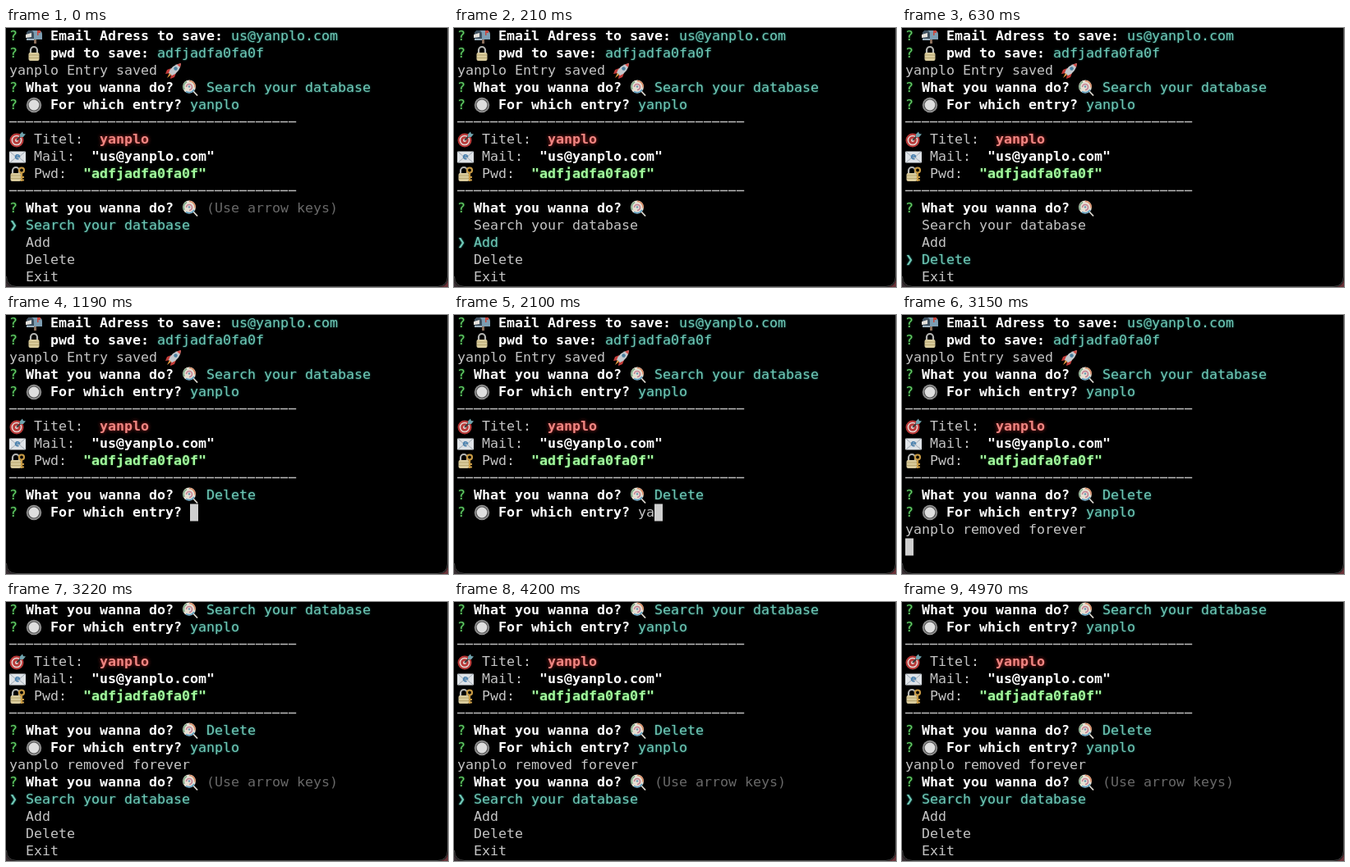
Recreate the animation shown at these times as an HTML page. Size 538 by 316 pixels, loop 5110 ms.

```html
<!DOCTYPE html>
<html lang="en">
<head>
<meta charset="utf-8">
<title>Password terminal</title>
<style>
  html, body { margin: 0; width: 100%; height: 100%; overflow: hidden; background: #000; }
  svg { display: block; width: 538px; height: 316px; }
  text { font: 16.61px "DejaVu Sans Mono", monospace; fill: #c4c4c4; }
  .b { font-weight: bold; fill: #fff; }
  .ask { fill: #64cf66; filter: drop-shadow(0 0 1px #1d6b2a); }
  .teal { fill: #70c8b6; filter: drop-shadow(0 0 1.2px #1f6f66); }
  .dim { fill: #686868; }
  .red { font-weight: bold; fill: #f08682; filter: drop-shadow(0 0 2px #b92a2a); }
  .green { font-weight: bold; fill: #a3f79d; filter: drop-shadow(0 0 1px #246f2c); }
</style>
</head>
<body>
<svg viewBox="0 0 538 316">
  <defs>
    <g id="mailbox">
      <path d="M10 12h3v7h-3z" fill="#8b6f5c"/>
      <path d="M1 14V8q0-5 4.500-5H15q5 0 5 5v6z" fill="#7c9db2"/>
      <path d="M1 14V8q0-5 4.500-5T10 8v6z" fill="#3d4f5e"/>
      <path d="M0 8l7-2v5l-7 1z" fill="#e5e2dc"/>
      <path d="M1 13h9v2H1z" fill="#9db2c0"/>
      <path d="M14 9V3h4v3h-2.500v3z" fill="#c8483f"/>
    </g>
    <g id="lock">
      <path d="M6 10V6a4 4 0 0 1 8 0v4" fill="none" stroke="#b5b6b4" stroke-width="2.200"/>
      <rect x="3.500" y="9" width="13" height="10" rx="2" fill="#d9cb9c"/>
      <path d="M4 12h12M4 15.500h12" stroke="#b8a771"/>
    </g>
    <g id="lockkey">
      <use href="#lock" x="-2"/>
      <g fill="none" stroke="#c79a45" stroke-width="2.200">
        <circle cx="15" cy="5.500" r="3"/>
        <path d="M15 9v10M15 14h3M15 17.500h3"/>
      </g>
    </g>
    <g id="rocket">
      <path d="M7 7L2 9l-2 5 6-1zM13 13l-2 5-5 2 1-6z" fill="#c43c39"/>
      <path d="M4 13Q7 3 19 1q-1 11-11 15z" fill="#c3c9ce"/>
      <path d="M14 2.500l5-1.500-1 5z" fill="#d24d47"/>
      <circle cx="12.500" cy="7.500" r="2.200" fill="#4a7f9f"/>
      <path d="M5 13l2 2-5 4z" fill="#e59a42"/>
    </g>
    <g id="candy">
      <path d="M13 13l6 6.500" stroke="#dedad2" stroke-width="1.800"/>
      <circle cx="9" cy="8.500" r="8" fill="#e6dfd2"/>
      <g fill="none" stroke-width="1.600">
        <path d="M9 1.500a7 7 0 0 1 7 8" stroke="#d98a63"/>
        <path d="M15 12a7 7 0 0 1-10 2.500" stroke="#5f9fc2"/>
        <path d="M3 12a7 7 0 0 1 3-9.500" stroke="#79aa86"/>
        <path d="M5.500 9a3.500 3.500 0 1 1 3.500 3.500" stroke="#c27f94"/>
      </g>
      <circle cx="9" cy="8.500" r="1.200" fill="#6796b0"/>
    </g>
    <g id="radio">
      <circle cx="10" cy="10" r="9.200" fill="#929292"/>
      <circle cx="10" cy="10" r="7.600" fill="#555"/>
      <circle cx="10" cy="10" r="6.400" fill="#dedede"/>
    </g>
    <g id="target">
      <circle cx="9" cy="11" r="8.500" fill="#b93a39"/>
      <circle cx="9" cy="11" r="5.600" fill="none" stroke="#e5d8d5" stroke-width="1.500"/>
      <circle cx="9" cy="11" r="2" fill="#e5d8d5"/>
      <path d="M9 11l7-7" stroke="#3b3b3b" stroke-width="2"/>
      <path d="M13 7V3.500l3-3 1 2.500 3 .5-3 3.500z" fill="#6fa3ad"/>
    </g>
    <g id="mail">
      <rect y="3.500" width="20" height="14" rx="1" fill="#dfe3e7"/>
      <path d="M1 17l7-6M19 17l-7-6M1 4l9 8 9-8" fill="none" stroke="#a0aab4"/>
      <path d="M7.500 10h5a2.500 2.500 0 1 0-1 2.300" fill="none" stroke="#4a80ad" stroke-width="1.600"/>
    </g>
  </defs>
  <g id="screen"></g>
  <path d="M0 304v12h12q-12 0-12-12z" fill="#3a3034"/>
  <path d="M538 304v12h-12q12 0 12-12z" fill="#6a3339"/>
  <path d="M.5 303q0 12.500 12.500 12.500h512q12.500 0 12.500-12.500V0" fill="none" stroke="#4c4c4c"/>
</svg>
<script>
const LOOP = 5110, COL = 10, ROW = 21, LEFT = 4;
const NAME = 'yanplo';
const ITEMS = ['Search your database', 'Add', 'Delete', 'Exit'];
const screen = document.getElementById('screen');

const text = (col, row, str, cls = '') =>
  `<text class="${cls}" x="${LEFT + col * COL}" y="${15 + row * ROW}">${str}</text>`;
const icon = (col, row, id) =>
  `<use href="#${id}" x="${LEFT + col * COL}" y="${row * ROW}"/>`;
const rule = row =>
  `<path d="M${LEFT} ${9.5 + row * ROW}h350" stroke="#bcbcbc" stroke-width="1.3" stroke-dasharray="9.2 .8"/>`;
const cursor = (col, row) =>
  `<rect x="${LEFT + col * COL}" y="${row * ROW - .5}" width="10" height="21" fill="#cfcfcf"/>`;

const ask = (row, id, label, value, cls = 'teal') =>
  text(0, row, '?', 'ask') + icon(2, row, id) + text(5, row, label, 'b') +
  text(6 + label.length, row, value, cls);
const action = (row, value, cls = 'teal') =>
  text(0, row, '?', 'ask') + text(2, row, 'What you wanna do?', 'b') +
  icon(21, row, 'candy') + text(24, row, value, cls);
const entry = (row, value, cls) => ask(row, 'radio', 'For which entry?', value, cls);
const field = (row, id, label, col, value, cls) =>
  icon(0, row, id) + text(3, row, label) + text(col, row, value, cls);
const menu = (row, pick, hint) =>
  action(row, hint ? '(Use arrow keys)' : '', 'dim') +
  ITEMS.map((item, i) =>
    (i === pick ? text(0, row + 1 + i, '❯', 'teal') : '') +
    text(2, row + 1 + i, item, i === pick ? 'teal' : '')).join('');

const history =
  ask(0, 'mailbox', 'Email Adress to save:', `us@${NAME}.com`) +
  ask(1, 'lock', 'pwd to save:', 'adfjadfa0fa0f') +
  text(0, 2, `${NAME} Entry saved`) + icon(19, 2, 'rocket') +
  action(3, ITEMS[0]) + entry(4, NAME) + rule(5) +
  field(6, 'target', 'Titel:', 11, NAME, 'red') +
  field(7, 'mail', 'Mail:', 10, `"us@${NAME}.com"`, 'b') +
  field(8, 'lockkey', 'Pwd:', 9, '"adfjadfa0fa0f"', 'green') +
  rule(9);

const deleted = action(10, 'Delete');
const typing = n => deleted + entry(11, NAME.slice(0, n), '') + cursor(22 + n, 11);
const answered = deleted + entry(11, NAME);
const removed = answered + text(0, 12, `${NAME} removed forever`);

// [start ms, content below the history, rows scrolled]
const steps = [
  [0, menu(10, 0, true)],
  [140, menu(10, 1)],
  [490, menu(10, 2)],
  [910, deleted],
  [1120, typing(0)],
  [1820, typing(1)],
  [2030, typing(2)],
  [2170, typing(3)],
  [2240, typing(4)],
  [2450, typing(6)],
  [2940, answered + cursor(0, 12)],
  [3010, removed + cursor(0, 13)],
  [3220, removed + menu(13, 0, true), 3]
];

let shown;
function draw(ms) {
  const step = steps.findLast(s => s[0] <= ms);
  if (step === shown) return;
  shown = step;
  const [, content, scroll = 0] = step;
  screen.innerHTML = history + content;
  screen.setAttribute('transform', `translate(0 ${-scroll * ROW})`);
}

const start = performance.now();
function tick() {
  draw((performance.now() - start) % LOOP);
  requestAnimationFrame(tick);
}
tick();
</script>
</body>
</html>
```
